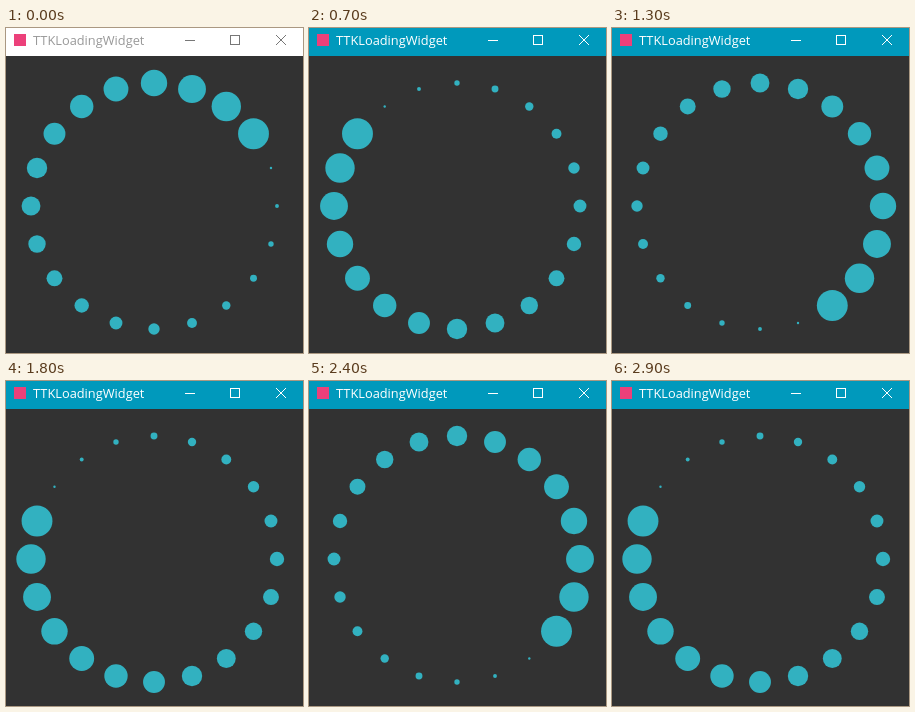
Animation of 297 by 325 pixels, one loop 3000 ms. Source, as an HTML page with a canvas:

```html
<!DOCTYPE html>
<html lang="en">
<head>
<meta charset="utf-8">
<title>TTKLoadingWidget</title>
<style>
  html, body { margin: 0; width: 100%; height: 100%; overflow: hidden; background: #323232; }
  canvas { display: block; }
</style>
</head>
<body>
<canvas id="stage" width="297" height="325"></canvas>
<script>
const ctx = document.getElementById('stage').getContext('2d');

const LOOP = 3000, TICK = 100;
const DOTS = 20, RING = 123, CX = 148, CY = 178;
const MIN_R = 1.2, MAX_R = 15.45;
const BAR = 28;

// The widget's own timer runs faster than the screen refresh; its first step lags.
function headAt(tick) {
  return tick === 0 ? 18 : Math.floor(20.22 + 1.76 * tick);
}

function strokePath(points) {
  ctx.beginPath();
  for (const [x1, y1, x2, y2] of points) {
    ctx.moveTo(x1, y1);
    ctx.lineTo(x2, y2);
  }
  ctx.stroke();
}

function drawTitleBar(active) {
  ctx.fillStyle = active ? '#0099bc' : '#ffffff';
  ctx.fillRect(0, 0, 297, BAR);

  ctx.fillStyle = '#ec407a';
  ctx.fillRect(8, 6, 12, 12);

  ctx.fillStyle = active ? '#ffffff' : '#999999';
  ctx.font = '12.8px "Open Sans", sans-serif';
  ctx.textBaseline = 'alphabetic';
  ctx.fillText('TTKLoadingWidget', 27, 17);

  ctx.strokeStyle = active ? '#ffffff' : '#777777';
  ctx.lineWidth = 1;
  strokePath([[179, 12.5, 189, 12.5]]);
  ctx.strokeRect(224.5, 7.5, 9, 9);
  strokePath([[270, 7, 280, 17], [280, 7, 270, 17]]);
}

function drawDots(head) {
  ctx.fillStyle = '#32b1c0';
  for (let lag = 0; lag < DOTS; lag++) {
    const angle = (head - lag) * 2 * Math.PI / DOTS;
    const radius = MAX_R - (MAX_R - MIN_R) * lag / (DOTS - 1);
    ctx.beginPath();
    ctx.arc(CX + RING * Math.cos(angle), CY + RING * Math.sin(angle), radius, 0, 2 * Math.PI);
    ctx.fill();
  }
}

function render(time) {
  const tick = Math.floor((time % LOOP) / TICK);
  ctx.fillStyle = '#323232';
  ctx.fillRect(0, 0, 297, 325);
  drawTitleBar(tick > 0);
  drawDots(headAt(tick));
}

const start = performance.now();
function loop() {
  render(performance.now() - start);
  requestAnimationFrame(loop);
}
loop();
</script>
</body>
</html>
```
